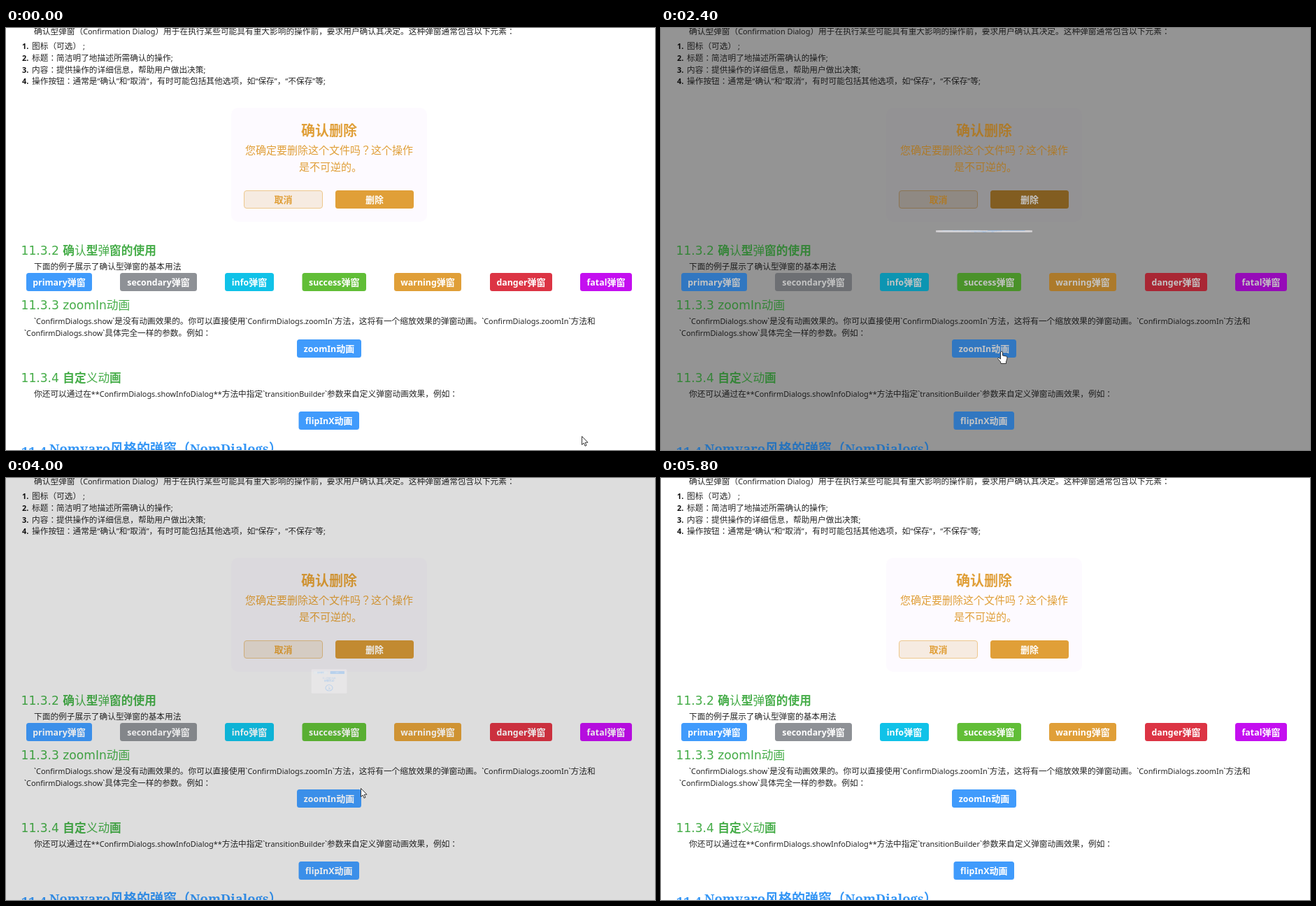
An HTML page with a canvas that plays this animation: 928x603 px, repeating every 6.47 s.

```html
<!DOCTYPE html>
<html lang="zh-CN">
<head>
<meta charset="utf-8">
<title>确认型弹窗</title>
<style>
html, body { margin: 0; width: 100%; height: 100%; overflow: hidden; background: #fff; }
canvas { display: block; }
</style>
</head>
<body>
<canvas id="stage" width="928" height="603"></canvas>
<script>
const W = 928, H = 603, LOOP = 6470, TICK = 1000 / 15, FLIP = 500;
const ctx = document.getElementById('stage').getContext('2d');
const CJK = '"Noto Sans CJK JP", "Noto Sans CJK SC", "Noto Sans CJK", sans-serif';
const BLUE = '#409bfc', ORANGE = '#e09f38', GREEN = '#46ad49', INK = '#262626';

const clamp = v => Math.max(0, Math.min(1, v));

// Splits a string into CJK and Latin runs so each gets its own face and size.
function runsOf(str, o) {
  const { size, weight = 400, latin = '"Noto Sans", sans-serif', ratio = 0.93 } = o;
  const parts = str.match(/[\u2e80-\uffef]+|[^\u2e80-\uffef]+/g) || [];
  return parts.map(s => {
    const wide = s.charCodeAt(0) >= 0x2e80;
    return { s, font: wide ? `${weight} ${size}px ${CJK}` : `${weight} ${size * ratio}px ${latin}` };
  });
}

// Draws text vertically centred on cy and returns its right end.
function text(g, str, x, cy, o) {
  const runs = runsOf(str, o);
  for (const r of runs) {
    g.font = r.font;
    r.w = g.measureText(r.s).width;
  }
  if (o.center) x -= runs.reduce((sum, r) => sum + r.w, 0) / 2;
  g.fillStyle = o.color || INK;
  for (const r of runs) {
    g.font = r.font;
    g.fillText(r.s, x, cy + o.size * 0.38);
    x += r.w;
  }
  return x;
}

function box(g, x, y, w, h, r, fill, stroke) {
  g.beginPath();
  g.roundRect(x, y, w, h, r);
  g.fillStyle = fill;
  g.fill();
  if (stroke) {
    g.strokeStyle = stroke;
    g.lineWidth = 1;
    g.stroke();
  }
}

function button(g, x, y, w, label, fill, color = '#fff', stroke) {
  box(g, x, y, w, 26, 3.5, fill, stroke);
  text(g, label, x + w / 2, y + 13.4, { size: 13, ratio: 0.95, weight: 600, color, center: true });
}

// An asterisk toggles the bold weight.
function heading(g, str, cy) {
  let x = 21.5;
  str.split('*').forEach((s, i) => {
    x = text(g, s, x, cy, {
      size: 16.7, weight: i % 2 ? 600 : 400, color: GREEN,
      latin: '"DejaVu Sans", sans-serif', ratio: 1.025
    });
  });
}

function layer(draw) {
  const c = document.createElement('canvas');
  c.width = W;
  c.height = H;
  draw(c.getContext('2d'));
  return c;
}

const base = layer(g => {
  g.fillStyle = '#fff';
  g.fillRect(0, 0, W, H);
  box(g, 322, 114, 280, 163, 10, '#fdfaff');
  box(g, 340.5, 232.5, 112, 25, 3.5, '#f6ebe1', '#eec88d');
  box(g, 471, 232, 112, 26, 3.5, ORANGE);
});

const content = layer(g => {
  const body = { size: 11.7 };
  text(g, '确认型弹窗（Confirmation Dialog）用于在执行某些可能具有重大影响的操作前，要求用户确认其决定。这种弹窗通常包含以下元素：', 40, 5, body);
  [
    '图标（可选） ;',
    '标题：简洁明了地描述所需确认的操作;',
    '内容：提供操作的详细信息，帮助用户做出决策;',
    '操作按钮：通常是“确认”和“取消”，有时可能包括其他选项，如“保存”，“不保存”等;'
  ].forEach((s, i) => {
    const y = 26 + i * 16.6;
    text(g, `${i + 1}.`, 23, y, { size: 11.7, weight: 700, color: '#111' });
    text(g, s, 37, y, body);
  });

  const mid = { color: ORANGE, center: true };
  text(g, '确认删除', 462, 146, { ...mid, size: 20, weight: 600 });
  text(g, '您确定要删除这个文件吗？这个操作', 462, 174.5, { ...mid, size: 15 });
  text(g, '是不可逆的。', 464, 198, { ...mid, size: 15 });
  text(g, '取消', 396.5, 245.5, { ...mid, size: 13, weight: 600 });
  text(g, '删除', 527, 245.5, { size: 13, weight: 600, color: '#fff', center: true });

  heading(g, '11.3.2 *确*认*型*弹*窗的使用', 318);
  text(g, '下面的例子展示了确认型弹窗的基本用法', 40, 341, body);
  [
    ['primary', 29, 94, BLUE], ['secondary', 163, 110, '#8e9196'], ['info', 313, 70, '#10c2e8'],
    ['success', 423.5, 91.5, '#61be37'], ['warning', 555, 96, ORANGE],
    ['danger', 692, 89, '#dc3444'], ['fatal', 821, 74, '#c40ff0']
  ].forEach(([name, x, w, fill]) => button(g, x, 350, w, name + '弹窗', fill));

  heading(g, '11.3.3 zoomIn动画', 396);
  text(g, '`ConfirmDialogs.show`是没有动画效果的。你可以直接使用`ConfirmDialogs.zoomIn`方法，这将有一个缩放效果的弹窗动画。`ConfirmDialogs.zoomIn`方法和', 40, 419, body);
  text(g, '`ConfirmDialogs.show`具体完全一样的参数。例如：', 26, 435.5, body);
  button(g, 416, 445, 92, 'zoomIn动画', BLUE);

  heading(g, '11.3.4 *自定*义动*画', 500);
  text(g, '你还可以通过在**ConfirmDialogs.showInfoDialog**方法中指定`transitionBuilder`参数来自定义弹窗动画效果，例如：', 40, 522.5, body);
  button(g, 418.5, 548, 86.5, 'flipInX动画', BLUE);

  const serif = { size: 19, weight: 700, color: '#3596f5', latin: '"Noto Serif", serif', ratio: 0.97 };
  text(g, '11.4', 22, 605, serif);
  text(g, 'Nomvaro风格的弹窗（NomDialogs）', 62, 601, serif);
});

// Dialog drawn around its own centre.
function dialog(g) {
  box(g, -140, -113, 280, 226, 10, '#fdfaff');
  g.strokeStyle = BLUE;
  g.lineWidth = 5.5;
  g.beginPath();
  g.arc(0, -61.5, 27.5, 0, Math.PI * 2);
  g.stroke();
  const mid = { color: BLUE, center: true };
  text(g, '?', 0, -61.5, { ...mid, size: 40, weight: 600 });
  text(g, '你确定吗', 0, 7, { ...mid, size: 20, weight: 600 });
  text(g, '这个是确认弹窗', 0, 32, { ...mid, size: 15 });
  button(g, -121.5, 68.5, 112, '我不确定', '#e3edf9', BLUE, '#a9cff7');
  button(g, 9, 68, 112, '确定', BLUE);
}

function arrow(g) {
  g.beginPath();
  [[0.5, 0.5], [0.5, 12.5], [3.2, 10], [5, 14.3], [7, 13.4], [5.2, 9.3], [9, 9.2]]
    .forEach(([x, y]) => g.lineTo(x, y));
  g.closePath();
}

function hand(g) {
  g.beginPath();
  g.moveTo(-1.5, 1);
  g.quadraticCurveTo(0, -1, 1.5, 1);
  g.lineTo(1.5, 6);
  g.lineTo(6.5, 7);
  g.quadraticCurveTo(8.5, 7.5, 8, 10);
  g.lineTo(6.5, 15);
  g.lineTo(6.5, 17.5);
  g.lineTo(-1, 17.5);
  g.lineTo(-1.5, 15);
  g.lineTo(-5.5, 10.5);
  g.quadraticCurveTo(-5, 8, -1.5, 11);
  g.closePath();
}

const path = [
  [0, 823, 583], [70, 815, 582], [400, 560, 556], [600, 483, 553], [1000, 483, 553],
  [1330, 478, 450], [1530, 420, 385], [1700, 400, 372], [1930, 500, 368], [2130, 505, 372],
  [2400, 487, 462], [2730, 462, 565], [3130, 459, 565], [3500, 512, 375], [3600, 515, 372],
  [4000, 507, 443], [4330, 432, 557], [4800, 432, 557], [5130, 510, 375], [5270, 512, 372],
  [5500, 600, 480], [5800, 760, 590]
];
const handTimes = [[480, 1100], [1500, 2450], [3420, 3700], [5080, 5340]];
const pressTimes = [[600, 1100], [2800, 3140], [4360, 4620]];
const dialogTimes = [[803, 2146], [2909, 3591], [4399, 5280]];
const during = (spans, t) => spans.some(([a, b]) => t >= a && t < b);

function cursor(g, t) {
  const i = path.findIndex(p => p[0] > t);
  if (i < 0) return;
  const [t0, x0, y0] = path[i - 1], [t1, x1, y1] = path[i];
  const k = (t - t0) / (t1 - t0);
  g.save();
  g.translate(Math.round(x0 + (x1 - x0) * k), Math.round(y0 + (y1 - y0) * k));
  (during(handTimes, t) ? hand : arrow)(g);
  g.fillStyle = '#fff';
  g.fill();
  g.strokeStyle = '#222';
  g.lineWidth = 0.9;
  g.stroke();
  g.restore();
}

// CSS-style "ease" curve, solved by bisection.
function ease(x) {
  let lo = 0, hi = 1;
  for (let i = 0; i < 20; i++) {
    const u = (lo + hi) / 2;
    if (0.75 * u * (1 - u) + u ** 3 < x) lo = u; else hi = u;
  }
  const v = 1 - lo;
  return 0.3 * v * v * lo + 3 * v * lo * lo + lo ** 3;
}

function render(t) {
  const open = dialogTimes.reduce((sum, [a, b]) =>
    sum + clamp((t - a) / FLIP) - clamp((t - b) / FLIP), 0);
  const dim = 0.53 * ease(open);

  ctx.drawImage(base, 0, 0);
  ctx.fillStyle = `rgba(0,0,0,${dim})`;
  ctx.fillRect(0, 0, W, H);

  if (during(pressTimes, t)) {
    ctx.save();
    ctx.shadowColor = 'rgba(0,0,0,0.45)';
    ctx.shadowBlur = 5;
    ctx.shadowOffsetY = 2;
    box(ctx, 419, 549, 85, 24, 3.5, BLUE);
    ctx.restore();
  }
  ctx.filter = dim > 0.002 ? `brightness(${1 - dim * 0.55})` : 'none';
  ctx.drawImage(content, 0, 0);
  ctx.filter = 'none';

  if (open > 0.001) {
    ctx.save();
    ctx.globalAlpha = open ** 0.75;
    ctx.translate(462, 290.5);
    ctx.scale(open, open * Math.cos(Math.PI * (1 - open)));
    dialog(ctx);
    ctx.restore();
  }
  cursor(ctx, t);
}

function frame() {
  const t = performance.now() % LOOP;
  render(Math.floor((t + 5) / TICK) * TICK);
  requestAnimationFrame(frame);
}
frame();
</script>
</body>
</html>
```
